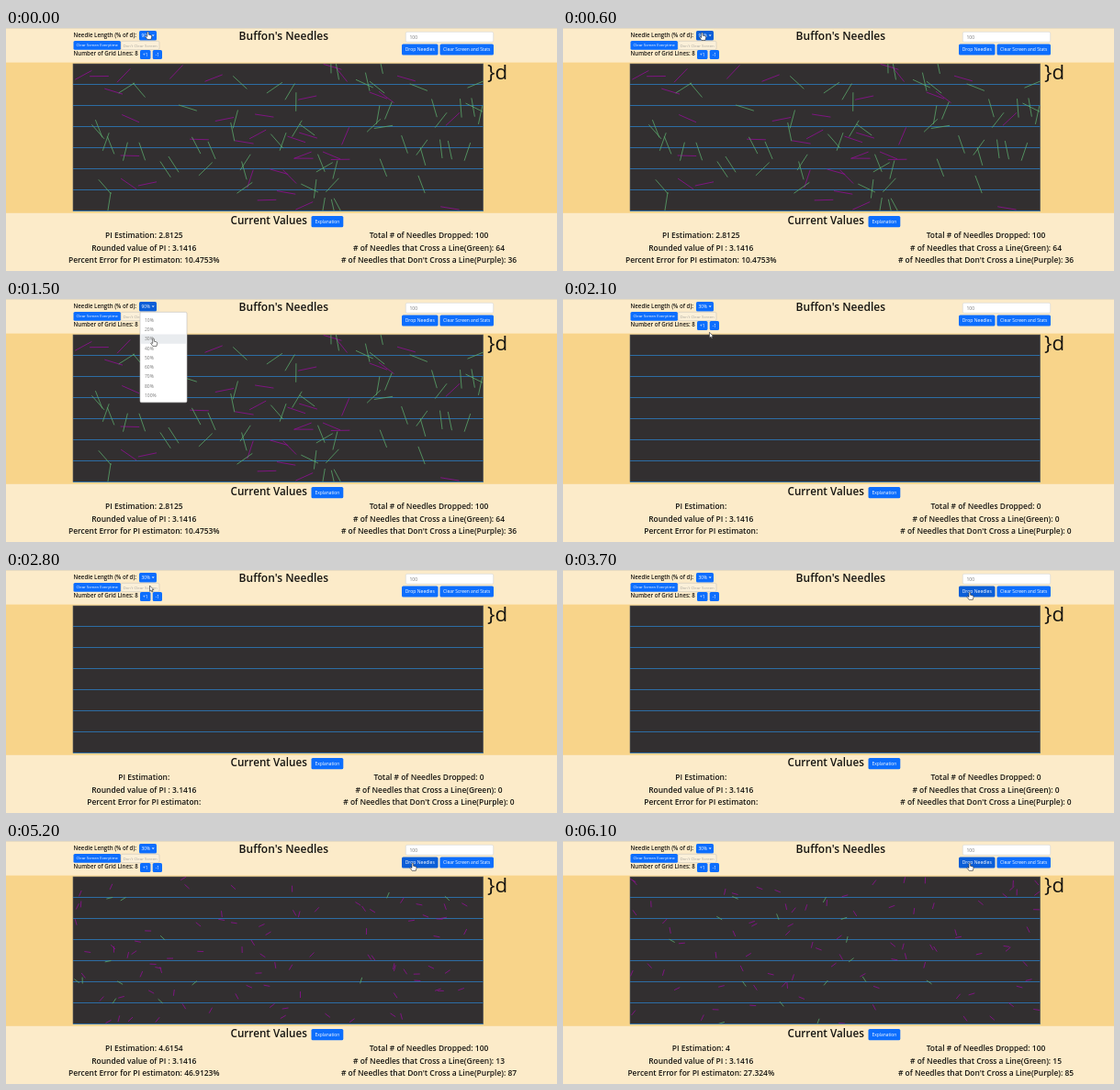
These frames come from a looping animation (600x265 px, 6.4 s). An HTML page:

```html
<!DOCTYPE html>
<html lang="en">
<head>
<meta charset="utf-8">
<title>Buffon's Needles</title>
<style>
  html, body { margin: 0; width: 100%; height: 100%; overflow: hidden; background: #fcebc9; }
  svg { display: block; width: 600px; height: 265px; }
  text { font-family: "Open Sans", "Noto Sans", sans-serif; fill: #161511; }
  .head { font-weight: 600; }
  .mid { text-anchor: middle; }
  .on-blue { fill: #fff; font-weight: 500; }
  .muted { fill: #777; }
  .off { fill: #aaa79f; }
</style>
</head>
<body>
<svg id="stage" viewBox="0 0 600 265" xmlns="http://www.w3.org/2000/svg"></svg>
<script>
const LOOP = 6400, STEP = 100;
const OPEN = 800, PICK = 1800;
const BOX = { x: 73, y: 39, w: 446.7, h: 160.3 };
const ROWS = 7, GAP = BOX.h / ROWS, NEEDLES = 100;
const BLUE = '#0d6efd', DARK = '#0b5ed7';

const stage = document.getElementById('stage');

function add(tag, attrs, parent = stage) {
  const node = document.createElementNS('http://www.w3.org/2000/svg', tag);
  for (const key in attrs) node.setAttribute(key, attrs[key]);
  parent.appendChild(node);
  return node;
}

function rect(x, y, width, height, fill, extra, parent) {
  return add('rect', { x, y, width, height, fill, ...extra }, parent);
}

function outlined(x, y, w, h, fill, stroke, parent) {
  return rect(x, y, w, h, fill, { rx: 1.6, stroke, 'stroke-width': 0.6 }, parent);
}

function label(str, x, y, size, cls = '', parent) {
  const node = add('text', { x, y, 'font-size': size, class: cls }, parent);
  node.textContent = str;
  return node;
}

function button(str, x, y, w, h, size) {
  const face = rect(x, y, w, h, BLUE, { rx: 1.6 });
  label(str, x + w / 2, y + h / 2 + size * 0.36, size, 'mid on-blue');
  return face;
}

function random(seed) {
  return () => {
    seed = (seed + 0x6D2B79F5) | 0;
    let v = Math.imul(seed ^ (seed >>> 15), 1 | seed);
    v = (v + Math.imul(v ^ (v >>> 7), 61 | v)) ^ v;
    return ((v ^ (v >>> 14)) >>> 0) / 4294967296;
  };
}

// Drops needles at random until both totals, crossing and clear, are met.
function scatter(seed, ratio, hits) {
  const rand = random(seed), r = GAP * ratio / 2;
  const row = y => Math.floor((y - BOX.y) / GAP);
  const left = { hit: hits, miss: NEEDLES - hits }, path = { hit: '', miss: '' };
  while (left.hit || left.miss) {
    const x = BOX.x + rand() * BOX.w, y = BOX.y + rand() * BOX.h, a = rand() * Math.PI;
    const dx = r * Math.cos(a), dy = r * Math.sin(a);
    const kind = row(y - dy) === row(y + dy) ? 'miss' : 'hit';
    if (!left[kind]) continue;
    left[kind]--;
    path[kind] += `M${(x - dx).toFixed(1)} ${(y - dy).toFixed(1)}L${(x + dx).toFixed(1)} ${(y + dy).toFixed(1)}`;
  }
  const group = add('g', { fill: 'none', 'stroke-width': 0.75, 'clip-path': 'url(#board)' });
  add('path', { d: path.miss, stroke: '#980c9c' }, group);
  add('path', { d: path.hit, stroke: '#5cae6e' }, group);
  return group;
}

function makeDrop(from, to, ratio, hits, seed) {
  const pi = 2 * ratio * NEEDLES / hits;
  const error = Math.abs(pi - Math.PI) / Math.PI * 100;
  return {
    from, to, hits, pi: +pi.toFixed(4), error: +error.toFixed(4) + '%',
    group: scatter(seed, ratio, hits)
  };
}

// Page background and board
rect(0, 0, 600, 0.8, '#e3d8c0');
rect(0, 37.6, 600, 164.2, '#f8d48a');
rect(BOX.x, BOX.y, BOX.w, BOX.h, '#322f30', { stroke: '#5d6063', 'stroke-width': 0.6 });
rect(BOX.x, BOX.y, BOX.w, BOX.h, '', {}, add('clipPath', { id: 'board' }));
for (let i = 1; i <= ROWS; i++) {
  const y = Math.floor(BOX.y + i * GAP) + 0.5;
  add('path', { d: `M${BOX.x} ${y}h${BOX.w}`, stroke: '#2d74b2', 'stroke-width': 0.9 });
}

const drops = [
  makeDrop(0, PICK, 0.9, 64, 11),
  makeDrop(3900, 5500, 0.3, 13, 23),
  makeDrop(5500, LOOP, 0.3, 15, 37)
];

// Header
label("Buffon's Needles", 302.3, 13, 12, 'head mid');
label('Needle Length (% of d):', 73.5, 10.2, 6.15, 'head');
label('Number of Grid Lines: 8', 73.5, 30.4, 6.15, 'head');
const lengthFace = rect(145, 3, 19, 10.5, BLUE, { rx: 1.6 });
const lengthText = label('', 147.5, 10, 4.8, 'on-blue');
add('path', { d: 'M158.6 7.4h3l-1.5 1.7z', fill: '#fff' });
button('Clear Screen Everytime', 73.5, 14, 51.5, 9.8, 4.25);
outlined(125.2, 14.3, 41.8, 9.4, '#fbf0d9', '#c9c5bb');
label("Don't Clear Screen", 146.1, 20.5, 4.35, 'mid off');
button('+1', 146, 24, 11.5, 10, 4.6);
button('-1', 159.7, 24, 10.3, 10, 4.6);
outlined(435.3, 4.3, 95.4, 11, '#fff', '#d3d5d6');
label('100', 439.5, 11.6, 5, 'muted');
const dropFace = button('Drop Needles', 431, 17.5, 39.5, 12, 5.05);
button('Clear Screen and Stats', 472.5, 17.5, 58.5, 12, 4.95);
label('}d', 524, 56.3, 22.3);

// Statistics
label('Current Values', 286.2, 214, 11.7, 'head mid');
button('Explanation', 332.5, 205, 34.8, 12.3, 4.9);
const column = x => [0, 1, 2].map(i => label('', x, 229 + i * 13.5, 8.45, 'head mid'));
const [piText, roundText, errorText] = column(150.3);
const [totalText, hitText, missText] = column(460.5);
roundText.textContent = 'Rounded value of PI : 3.1416';

// Length menu
const MENU_TOP = 18, ITEM = 10.25;
const menu = add('g', {});
outlined(146, 14.3, 51, 98.5, '#fff', '#bdbdbd', menu);
const rowFace = rect(146.4, 0, 50.2, ITEM, '#e9ecef', {}, menu);
for (let i = 0; i < 9; i++) {
  const percent = i < 8 ? (i + 1) * 10 : 100;
  label(percent + '%', 151, MENU_TOP + 6.9 + i * ITEM, 5, 'muted', menu);
}

// Pointer shapes, tip at the origin
const ink = { fill: '#fff', stroke: '#222', 'stroke-width': 0.6, 'stroke-linejoin': 'round' };
const hand = add('path', {
  d: 'M-.8 .6Q0-.4.8.6V3.2L3.2 3.8Q4.4 4.1 4.2 5.4L3.5 8.4H-.6L-2.8 5.5Q-2.8 4.3-.8 5.4Z', ...ink
});
const arrow = add('path', { d: 'M0 0V6.2L1.5 4.9 2.5 7 3.4 6.6 2.5 4.6H4.4Z', ...ink });

// Pointer moves: start time, end time, end point
const moves = [
  [0, 600, 151.5, 5],
  [900, 1400, 160.5, 43],
  [PICK, 2700, 156.5, 17],
  [2800, 3500, 442.8, 24]
];

function pointerAt(t) {
  let x = 154.5, y = 4;
  for (const [from, to, toX, toY] of moves) {
    const u = Math.min(1, Math.max(0, (t - from) / (to - from)));
    const e = u * u * (3 - 2 * u);
    x += (toX - x) * e;
    y += (toY - y) * e;
  }
  return [x, y];
}

const show = (node, on) => node.setAttribute('visibility', on ? 'visible' : 'hidden');

function drawStats(drop) {
  const { pi, error, hits } = drop || { pi: '', error: '', hits: 0 };
  const total = drop ? NEEDLES : 0;
  piText.textContent = `PI Estimation: ${pi}`;
  errorText.textContent = `Percent Error for PI estimaton: ${error}`;
  totalText.textContent = `Total # of Needles Dropped: ${total}`;
  hitText.textContent = `# of Needles that Cross a Line(Green): ${hits}`;
  missText.textContent = `# of Needles that Don't Cross a Line(Purple): ${total - hits}`;
}

function draw(t) {
  const current = drops.find(d => t >= d.from && t < d.to);
  drops.forEach(d => show(d.group, d === current));
  drawStats(current);

  const [x, y] = pointerAt(t);
  const open = t >= OPEN && t < PICK;
  const row = Math.floor((y - MENU_TOP) / ITEM);
  show(menu, open);
  show(rowFace, open && row >= 0);
  rowFace.setAttribute('y', MENU_TOP + row * ITEM);
  lengthText.textContent = t < PICK ? '90%' : '30%';
  lengthFace.setAttribute('fill', t >= STEP && t < PICK ? DARK : BLUE);

  const overDrop = x > 431 && y > 17.5;
  dropFace.setAttribute('fill', overDrop ? DARK : BLUE);
  const pointing = t < PICK || overDrop;
  show(hand, pointing);
  show(arrow, !pointing);
  (pointing ? hand : arrow).setAttribute('transform', `translate(${x.toFixed(2)} ${y.toFixed(2)})`);
}

const start = performance.now();
function tick() {
  const t = (performance.now() - start) % LOOP;
  draw(Math.floor(t / STEP) * STEP);
  requestAnimationFrame(tick);
}
tick();
</script>
</body>
</html>
```
